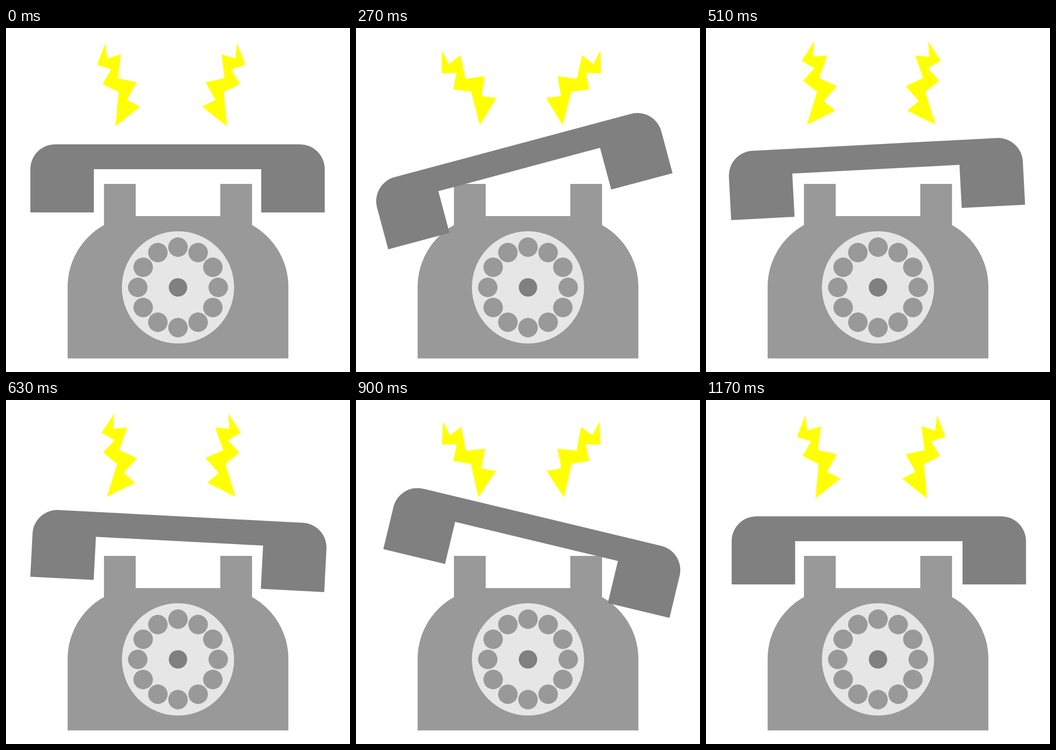
An HTML page for the animation above (1200 ms loop, 748 by 748 pixels).

```html
<!DOCTYPE html>
<html lang="en">
<head>
<meta charset="utf-8">
<title>Ringing telephone</title>
<style>
  html, body { margin: 0; width: 100%; height: 100%; overflow: hidden; background: #fff; }
  svg { display: block; width: 100%; height: 100%; }
</style>
</head>
<body>
<svg viewBox="0 0 748 748">
  <defs>
    <path id="bolt" d="M216 33L220.5 66.5L250 57L243.3 109L284.5 118L263 156L292 171L238 214L245 139.5L210 121.5L229 90L198 80Z"/>
  </defs>
  <g fill="#ff0">
    <use id="left" href="#bolt"/>
    <g transform="translate(718.7 0) scale(-1 1)"><use id="right" href="#bolt"/></g>
  </g>
  <path fill="#999" d="M134 718.5V563A154 154 0 0 1 213 428.5V339H282V409H466V339H535V428.5A154 154 0 0 1 614 563V718.5Z"/>
  <circle cx="374" cy="564" r="122" fill="#e6e6e6"/>
  <g id="holes" fill="#999"></g>
  <circle cx="374" cy="564" r="20" fill="#808080"/>
  <path id="handset" fill="#808080" d="M-320 74V-20A54 54 0 0 1 -266 -74H266A54 54 0 0 1 320 -20V74H182V-20H-182V74Z"/>
</svg>
<script>
  const STEP = 30, STEPS = 40;
  const KEYS = [0, 9, 19, 29, 39];
  const TILT = [0, -15, 0, 15, 0];
  const SHIFT = [373, 360, 373, 389.2, 375.8];
  const SWING = [0, -20, 20, -20, 0];
  const el = id => document.getElementById(id);

  for (let i = 0; i < 12; i++) {
    const a = i * Math.PI / 6;
    const hole = document.createElementNS("http://www.w3.org/2000/svg", "circle");
    hole.setAttribute("cx", 374 + 87.5 * Math.sin(a));
    hole.setAttribute("cy", 564 - 87.5 * Math.cos(a));
    hole.setAttribute("r", 21.2);
    el("holes").append(hole);
  }

  // Linear interpolation between the key steps
  function tween(values, n) {
    let i = 0;
    while (i < KEYS.length - 2 && n > KEYS[i + 1]) i++;
    const p = (n - KEYS[i]) / (KEYS[i + 1] - KEYS[i]);
    return values[i] + (values[i + 1] - values[i]) * p;
  }

  function draw(ms) {
    const n = Math.floor(ms / STEP) % STEPS;
    el("handset").setAttribute("transform",
      `translate(${tween(SHIFT, n)} 327) rotate(${tween(TILT, n)})`);
    const turn = `rotate(${tween(SWING, n)} 245 123.5)`;
    el("left").setAttribute("transform", turn);
    el("right").setAttribute("transform", turn);
  }

  const start = performance.now();
  function tick() {
    draw(performance.now() - start);
    requestAnimationFrame(tick);
  }
  draw(0);
  requestAnimationFrame(tick);
</script>
</body>
</html>
```
